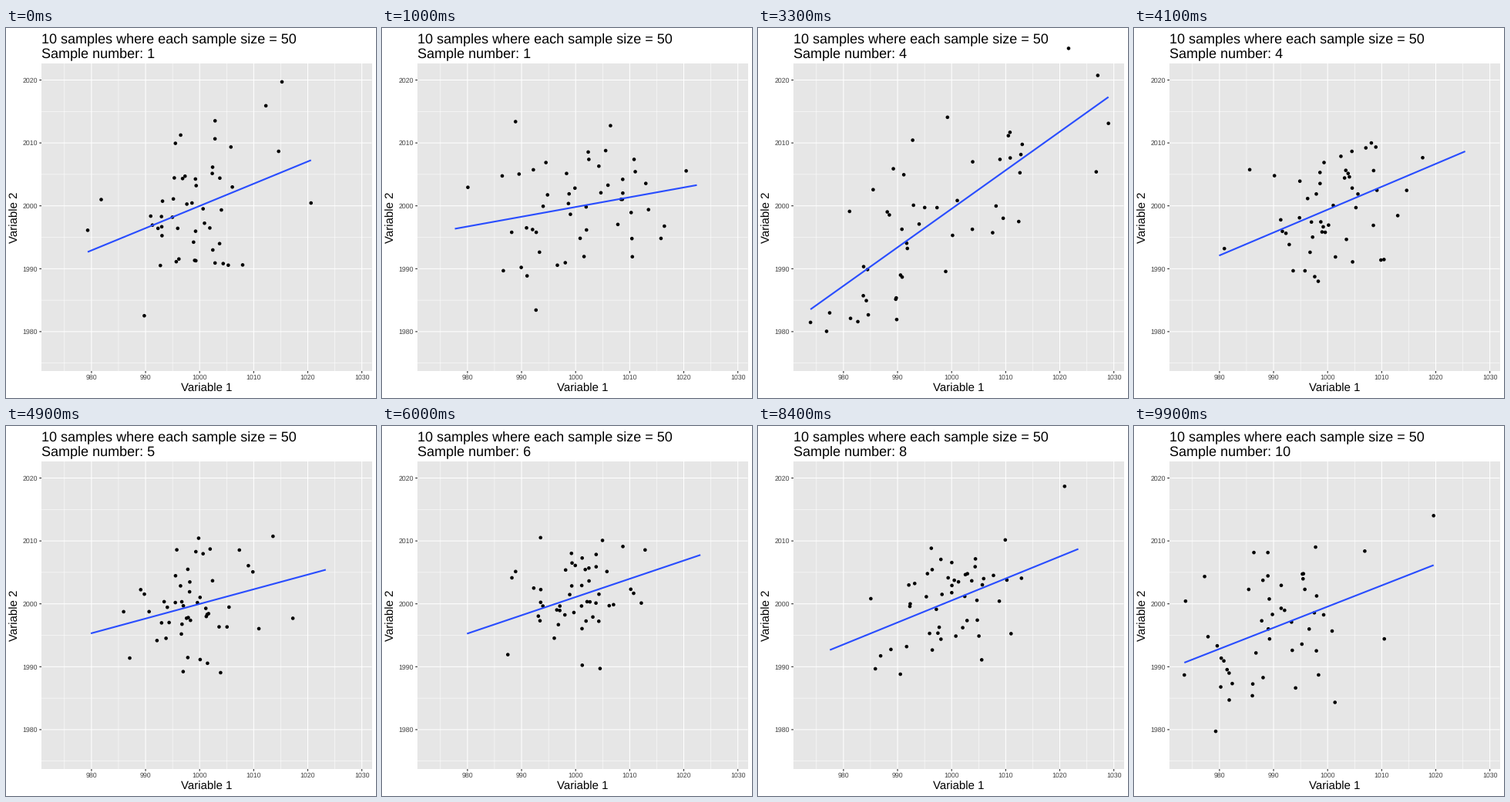
A matplotlib script for the animation above (10000 ms loop, 480 px wide and 480 px high).

```python
import numpy as np
import matplotlib.pyplot as plt
from matplotlib.animation import FuncAnimation
from matplotlib.patches import Rectangle

SIZE, FRAMES, STEP, COUNT = 480, 100, 11, 50
PT = 0.72  # points per pixel at 100 dpi
LEFT, RIGHT, TOP, BOTTOM = 46, 474.5, 46, 445
SPREAD = 7  # standard deviation of the dots around their trend

plt.rcParams.update({"font.family": "Liberation Sans", "text.hinting": "none"})

# Trend line of each sample, from its leftmost to its rightmost dot: x0, y0, x1, y1
trends = np.array([
    (979.3, 1992.67, 1020.6, 2007.26),
    (977.5, 1996.72, 1022.6, 2002.90),
    (979.2, 1996.72, 1022.5, 2002.90),
    (973.9, 1983.54, 1029.0, 2017.30),
    (982.2, 1995.30, 1024.1, 2005.42),
    (977.1, 1995.30, 1022.4, 2005.42),
    (983.3, 1995.20, 1023.9, 2010.60),
    (982.2, 1993.65, 1018.4, 2009.46),
    (974.8, 1992.10, 1026.3, 2008.30),
    (973.5, 1990.65, 1019.6, 2006.15)])


def make_sample(rng, x0, y0, x1, y1):
    """Random dots that span x0..x1 and whose regression line is the trend."""
    x = rng.normal(size=COUNT)
    x = x0 + (x1 - x0) * (x - x.min()) / np.ptp(x)
    noise = rng.normal(size=COUNT)
    noise -= np.polyval(np.polyfit(x, noise, 1), x)
    noise *= SPREAD / noise.std()
    return np.column_stack([x, y0 + (y1 - y0) * (x - x0) / (x1 - x0) + noise])


rng = np.random.default_rng(50)
samples = np.array([make_sample(rng, *t) for t in trends])


def blend(states, i):
    """Linear move from one sample to the next."""
    k, part = divmod(i, STEP)
    nxt = min(k + 1, len(states) - 1)
    return states[k] + (states[nxt] - states[k]) * part / STEP


def px(v):
    return 251.2 + 7.015 * (v - 1000)


def py(v):
    return 230.7 - 8.16 * (v - 2000)


fig = plt.figure(figsize=(4.8, 4.8), dpi=100, facecolor="white")
ax = fig.add_axes([0, 0, 1, 1])
ax.set(xlim=(0, SIZE), ylim=(SIZE, 0))
ax.axis("off")


def rule(xs, ys, color, width):
    ax.plot(xs, ys, color=color, lw=width * PT, solid_capstyle="butt", snap=False, zorder=1)


def label(x, y, s, size, color="black", **kw):
    return ax.text(x, y, s, fontsize=size * PT, color=color, va="baseline", **kw)


ax.add_patch(Rectangle((LEFT, TOP), RIGHT - LEFT, BOTTOM - TOP, fc="#e6e6e6", lw=0, zorder=0))

for v in range(975, 1031, 5):
    rule([px(v)] * 2, [TOP, BOTTOM], "white", 0.53 if v % 10 else 1.07)
for v in range(1975, 2021, 5):
    rule([LEFT, RIGHT], [py(v)] * 2, "white", 0.53 if v % 10 else 1.07)
for v in range(980, 1031, 10):
    rule([px(v)] * 2, [BOTTOM, BOTTOM + 2.75], "#272727", 1.07)
    label(px(v), 456.2, str(v), 8.8, "#404040", ha="center")
for v in range(1980, 2021, 10):
    rule([LEFT - 2.75, LEFT], [py(v)] * 2, "#272727", 1.07)
    label(41, py(v) + 3.3, str(v), 8.8, "#404040", ha="right")

label(46, 19.4, "10 samples where each sample size = 50", 18)
title = label(46, 38.4, "", 18)
label(260, 472, "Variable 1", 15, ha="center")
label(16, 245.5, "Variable 2", 15, ha="center", rotation=90, rotation_mode="anchor")

# One size per dot keeps positions from being rounded to whole pixels
dots = ax.scatter(*samples[0].T, s=np.full(COUNT, (4.6 * PT) ** 2), c="black", lw=0, zorder=2)
trend, = ax.plot([], [], color="#294dff", lw=2.13 * PT, solid_capstyle="butt", zorder=3)


def draw(i):
    x, y = blend(samples, i).T
    dots.set_offsets(np.column_stack([px(x), py(y)]))
    x0, y0, x1, y1 = blend(trends, i)
    trend.set_data([px(x0), px(x1)], [py(y0), py(y1)])
    title.set_text(f"Sample number: {i // STEP + 1}")
    return dots, trend, title


anim = FuncAnimation(fig, draw, frames=FRAMES, interval=100, repeat=True, repeat_delay=0)
plt.show()
```
